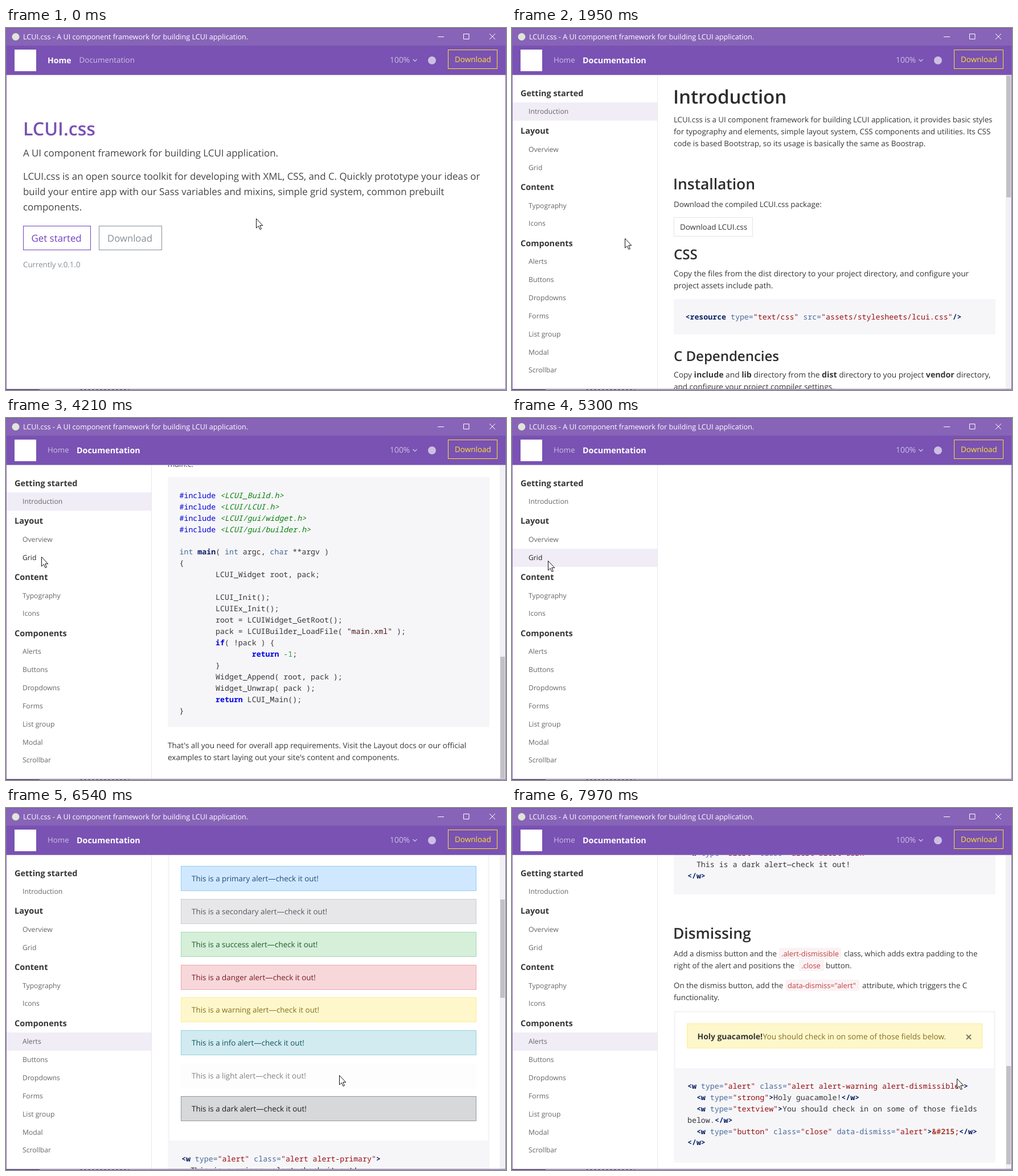
An HTML page that plays this animation: 878x637 px, repeating every 8000 ms.

```html
<!DOCTYPE html>
<html lang="en">
<head>
<meta charset="utf-8">
<title>LCUI.css</title>
<style>
html, body { margin: 0; width: 100%; height: 100%; overflow: hidden; background: #fff; }
#stage { display: block; width: 878px; height: 637px; }
text {
  font-family: "Open Sans", "Noto Sans", sans-serif; fill: #363636;
  white-space: pre; text-rendering: geometricPrecision;
}
rect { shape-rendering: crispEdges; }
.b { font-weight: 700; }
.h { font-weight: 600; fill: #2d2d2f; }
.w { fill: #fff; }
.dim { fill: #cdbfe3; }
.lead { fill: #444; }
.mono { font-family: "Noto Sans Mono", "DejaVu Sans Mono", monospace; }
.tag { fill: #0a2463; font-weight: 700; }
.attr { fill: #4a6a96; }
.str { fill: #990f0f; }
.ent { fill: #a8402f; font-weight: 700; }
.pre { fill: #0000d8; }
.inc { fill: #0a800a; font-style: italic; }
.type { fill: #456a96; }
.fn { fill: #101c6a; font-weight: 600; }
.key { fill: #0000e0; font-weight: 700; }
.cstr { fill: #4d1512; }
.num { fill: #249a3a; }
</style>
</head>
<body>
<svg id="stage" viewBox="0 0 878 637"></svg>
<script>
const BODY = 13.35, WIDE = 13.72, CODE = 13.25, LEADING = 19.95;
const PURPLE = '#7952b3', BORDER = '#8864b8', YELLOW = '#ffe12b';

// Text is placed by its left edge and the middle of its capitals.
const text = (x, mid, size, str, cls = '', extra = '') =>
  `<text x="${x}" y="${(mid + size * .357).toFixed(2)}" font-size="${size}" class="${cls}" ${extra}>${str}</text>`;
const rect = (x, y, w, h, fill, extra = '') =>
  `<rect x="${x}" y="${y}" width="${w}" height="${h}" fill="${fill}" ${extra}/>`;
const frame = (x, y, w, h, stroke, fill = 'none') =>
  rect(x + .5, y + .5, w - 1, h - 1, fill, `stroke="${stroke}"`);
const group = (id, ...parts) => `<g id="${id}">${parts.join('')}</g>`;
const span = (cls, s) => `<tspan class="${cls}">${s}</tspan>`;
const esc = s => s.replace(/&/g, '&amp;').replace(/</g, '&lt;');

// Wraps each match in the class named by its capture group.
function paint(line, rules) {
  let out = '', last = 0;
  for (const m of line.matchAll(rules)) {
    const cls = Object.keys(m.groups).find(k => m.groups[k] !== undefined);
    out += esc(line.slice(last, m.index)) + span(cls, esc(m[0]));
    last = m.index + m[0].length;
  }
  return out + esc(line.slice(last));
}
const XML = /(?<pre><\?.*\?>)|(?<tag><\/?[\w-]+|\/?>)|(?<str>"[^"]*")|(?<attr>[\w-]+=(?="))|(?<ent>&#\d+;)/g;
const C = /(?<pre>#include)|(?<inc><.*>)|(?<type>\b(?:int|char)\b)|(?<fn>\bmain(?=\())|(?<key>\b(?:if|return)\b)|(?<cstr>"[^"]*")|(?<num>-1)/g;
const code = (x, mid, src, rules = XML) => src.split('\n').map((line, i) =>
  line && text(x, mid + i * LEADING, CODE, paint(line, rules), 'mono')).join('');
const block = (y, bottom) => rect(284, y, 565, bottom - y, '#f6f6f9');
const card = (y, bottom) => rect(285.5, y + 1.5, 562, bottom - y, '#fff', 'stroke="#f6f6f9" stroke-width="3"');

// Window and navigation bar
const chrome = [
  rect(0, 0, 878, 31, BORDER), rect(0, 0, 878, 1, '#7c59ad'),
  '<circle cx="17" cy="15.5" r="6.5" fill="#dfe6d6"/>',
  text(30, 15.5, 12.66, 'LCUI.css - A UI component framework for building LCUI application.', 'w'),
  '<path d="M758 15.5h11M803.5 10.5h9.5v9h-9.5zM849 10l10 10M859 10l-10 10" fill="none" stroke="#fff"/>',
  rect(0, 31, 878, 51, PURPLE), rect(0, 82, 878, 1, '#a78bcf'),
  rect(15, 38, 38, 38, '#fff'),
  text(674, 56, 13.9, '100%', 'dim'),
  '<path d="M714.5 55l3.5 3.5l3.5-3.5" fill="none" stroke="#cdbfe3" stroke-width="1.4"/>',
  '<circle cx="748" cy="57" r="7" fill="#cdbfe3"/>',
  frame(776, 38, 87, 34, YELLOW),
  text(788, 55.5, 13.5, 'Download', '', `style="fill:${YELLOW}"`),
  group('navHome',
    text(73, 56.5, 14.1, 'Home', 'b w'),
    text(128.5, 56.5, 13.43, 'Documentation', 'dim', 'id="link"')),
  group('navDocs',
    text(73, 56.5, 13.3, 'Home', 'dim'),
    text(124, 56.5, 14.3, 'Documentation', 'b w'))
].join('');

// Window border, with the slivers of the desktop under it
const edges = rect(0, 31, 1, 605, BORDER) + rect(877, 31, 1, 605, BORDER) +
  rect(0, 635, 878, 1, '#8d70b8') + rect(0, 636, 878, 1, '#b9b9b9') + rect(0, 636, 59, 1, '#555') +
  '<path d="M131 636.5h85" stroke="#333" stroke-dasharray="2 5"/>';

const home = group('home',
  text(30, 177.5, 32.2, 'LCUI.css', 'h', `style="fill:${PURPLE}"`),
  [[220, 'A UI component framework for building LCUI application.'],
   [261, 'LCUI.css is an open source toolkit for developing with XML, CSS, and C. Quickly prototype your ideas or'],
   [288, 'build your entire app with our Sass variables and mixins, simple grid system, common prebuilt'],
   [315, 'components.']].map(([y, s]) => text(30, y, 16.89, s, 'lead')).join(''),
  frame(30, 348, 119, 43, '#6f42c1'),
  text(44.5, 370, 16.9, 'Get started', '', 'style="fill:#6f42c1"'),
  frame(163, 348, 111, 43, '#868e96'),
  text(178, 370, 16.7, 'Download', '', 'style="fill:#868e96"'),
  text(30, 416.5, 13.3, 'Currently v.0.1.0', '', 'style="fill:#868e96"'));

// Sidebar
const heads = [[115, 'Getting started'], [181, 'Layout'], [280, 'Content'], [378.5, 'Components']];
const items = [[147, 'Introduction'], [214, 'Overview'], [246, 'Grid'], [313, 'Typography'], [344, 'Icons'],
  ...['Alerts', 'Buttons', 'Dropdowns', 'Forms', 'List group', 'Modal', 'Scrollbar'].map((s, i) => [411 + i * 31.85, s])];
const side = group('side',
  rect(255, 83, 1, 552, '#e9e9ec'),
  rect(1, 131, 254, 32, '#f0edf7', 'id="active"'),
  heads.map(([y, s]) => text(15, y, 14.5, s, 'b')).join(''),
  items.map(([y, s]) => text(29, y, 12.2, s, 'item')).join(''));

const intro = group('intro',
  text(283, 121.5, 33.1, 'Introduction', 'h'),
  text(284, 161.5, 13.28, 'LCUI.css is a UI component framework for building LCUI application, it provides basic styles'),
  text(284, 182.5, 13.43, 'for typography and elements, simple layout system, CSS components and utilities. Its CSS'),
  text(284, 203.5, 13.43, 'code is based Bootstrap, so its usage is basically the same as Boostrap.'),
  text(283, 274.5, 26.4, 'Installation', 'h'),
  text(284, 310, 13.3, 'Download the compiled LCUI.css package:'),
  frame(284, 333, 139, 34, '#e2e4e8'),
  text(295, 350.5, 13.4, 'Download LCUI.css'),
  text(284, 398.5, 24, 'CSS', 'h'),
  text(284, 432.5, WIDE, 'Copy the files from the dist directory to your project directory, and configure your'),
  text(284, 453.5, WIDE, 'project assets include path.'),
  block(477, 539),
  code(304.5, 508, '<resource type="text/css" src="assets/stylesheets/lcui.css"/>'),
  text(284, 577, 24, 'C Dependencies', 'h'),
  text(284, 610.5, WIDE, 'Copy *include* and *lib* directory from the *dist* directory to you project *vendor* directory,'
    .replace(/\*(\w+)\*/g, '<tspan class="b" font-size="14.2">$1</tspan>')),
  text(284, 631.5, 13.5, 'and configure your project compiler settings.'),
  text(284, 703, 26.6, 'Starter template', 'h'),
  text(284, 738, BODY, 'main.xml:'),
  block(762, 943),
  code(304.5, 793, `<?xml version="1.0" encoding="UTF-8" ?>
<lcui-app>
  <resource type="text/css" src="assets/stylesheets/lcui.css"/>
  <ui>
    <w type="h1">Hello, world!</w>
  </ui>
</lcui-app>`),
  text(284, 975, BODY, 'main.c:'),
  block(998, 1438),
  code(304.5, 1030, `#include <LCUI_Build.h>
#include <LCUI/LCUI.h>
#include <LCUI/gui/widget.h>
#include <LCUI/gui/builder.h>

int main( int argc, char **argv )
{
        LCUI_Widget root, pack;

        LCUI_Init();
        LCUIEx_Init();
        root = LCUIWidget_GetRoot();
        pack = LCUIBuilder_LoadFile( "main.xml" );
        if( !pack ) {
                return -1;
        }
        Widget_Append( root, pack );
        Widget_Unwrap( pack );
        return LCUI_Main();
}`, C),
  text(284, 1470.5, 13.5, "That's all you need for overall app requirements. Visit the Layout docs or our official"),
  text(284, 1491.5, 13.5, "examples to start laying out your site's content and components."));

// Alerts page: name, background, border, text colour
const kinds = [
  ['primary', '#d0e8ff', '#93cbf8', '#1c4c78'], ['secondary', '#e7e7e9', '#cbcccf', '#55595c'],
  ['success', '#d5efd9', '#a3dbad', '#1a5a2a'], ['danger', '#f8d7da', '#eea5ad', '#721c24'],
  ['warning', '#fef7cb', '#fdec94', '#85701f'], ['info', '#d2ebf0', '#93d0df', '#0f5360'],
  ['light', '#fdfdfe', '#fcfcfd', '#818285'], ['dark', '#d6d8d9', '#96999c', '#1b1e21']];
const says = k => `This is a ${k} alert—check it out!`;
const badge = (x, mid, w, s) =>
  rect(x, mid - 10.5, w, 20, '#fbf2f3', 'rx="3"') + text(x + 4, mid, 12.8, s, '', 'style="fill:#bd4147"');

const alerts = group('alerts',
  text(283, 121.5, 33.1, 'Alerts', 'h'),
  card(331, 836),
  kinds.map(([k, bg, line, ink], i) => {
    const y = Math.round(353.3 + i * 57.75);
    return frame(307, y, 519, 44, line, bg) + text(326, y + 22.5, 13.4, says(k), '', `style="fill:${ink}"`);
  }).join(''),
  block(836, 1360),
  code(308, 868, kinds.map(([k]) => `<w type="alert" class="alert alert-${k}">\n  ${says(k)}\n</w>`).join('\n')),
  text(283, 1429, 26.4, 'Dismissing', 'h'),
  text(284, 1464.5, 13.26, 'Add a dismiss button and the'), badge(469, 1464.5, 109, '.alert-dismissible'),
  text(583, 1464.5, 13.26, 'class, which adds extra padding to the'),
  text(284, 1485.5, BODY, 'right of the alert and positions the'), badge(504, 1485.5, 44, '.close'),
  text(551, 1485.5, BODY, 'button.'),
  text(284, 1520, BODY, 'On the dismiss button, add the'), badge(480, 1520, 130, 'data-dismiss="alert"'),
  text(615, 1520, BODY, 'attribute, which triggers the C'),
  text(284, 1541, BODY, 'functionality.'),
  card(1565, 1668),
  frame(307, 1587, 519, 44, '#fdec94', '#fef7cb'),
  text(325.5, 1610.5, 13.9, 'Holy guacamole!', 'b'),
  text(440.5, 1610.5, 13.64, 'You should check in on some of those fields below.', '', 'style="fill:#85701f"'),
  '<path d="M798 1607l8 8M806 1607l-8 8" stroke="#7c7864" stroke-width="2"/>',
  block(1666, 1829), rect(284, 1830, 565, 1, '#ececf0'),
  code(308, 1697, `<w type="alert" class="alert alert-warning alert-dismissible">
  <w type="strong">Holy guacamole!</w>
  <w type="textview">You should check in on some of those fields
below.</w>
  <w type="button" class="close" data-dismiss="alert">&#215;</w>
</w>`));

const stage = document.getElementById('stage');
stage.innerHTML = rect(0, 0, 878, 637, '#fff') + home + side +
  `<svg x="256" y="83" width="621" height="552" viewBox="256 83 621 552">${intro}${alerts}</svg>` +
  group('bar', rect(867, 83, 10, 552, '#f1f1f1'), rect(868, 84, 8, 214, '#c2c2c2', 'id="thumb"')) +
  chrome + edges +
  '<path id="cursor" d="M.5.5V17l3.8-3.5l2.7 6l2.4-1l-2.6-5.9h5z" fill="#fff" stroke="#111" stroke-linejoin="round"/>';

// Moves: first step, last step, number of steps, target
const cursorMoves = [
  [230, 774, 8, 171, 57], [852, 930, 2, 168, 190], [1310, 1310, 1, 166, 357], [1388, 1780, 6, 171, 366],
  [1950, 2187, 4, 341, 390], [2820, 2970, 3, 432, 362], [3830, 4210, 6, 62, 244],
  [5300, 5850, 8, 86, 411], [6157, 6387, 4, 585, 470], [7330, 7730, 6, 781, 476]];
const introScroll = [[2266, 2590, 5, 446], [2660, 2740, 2, 560], [2820, 2970, 3, 730], [3280, 3360, 2, 835], [3660, 3660, 1, 894]];
const alertScroll = [[6387, 6540, 3, 251], [6790, 6790, 1, 330], [7020, 7100, 2, 480], [7330, 7970, 9, 1208]];

function follow(t, start, moves, ease = k => k) {
  let at = start;
  for (const [t0, t1, n, ...to] of moves) {
    if (t < t0) break;
    const k = n === 1 ? 1 : Math.min(n, Math.floor((t - t0) / (t1 - t0) * (n - 1)) + 1) / n;
    at = at.map((v, i) => v + (to[i] - v) * ease(k));
  }
  return at;
}
const smooth = k => k * k * (3 - 2 * k);

const $ = id => document.getElementById(id);
const rows = [...document.querySelectorAll('.item')];
const show = (id, on) => { $(id).style.display = on ? '' : 'none'; };
const shift = (id, x, y) => $(id).setAttribute('transform', `translate(${x} ${y})`);

function draw(t) {
  const [x, y] = follow(t, [439, 335], cursorMoves, smooth).map(Math.round);
  const docs = t >= 852, onIntro = t >= 1310 && t < 4540, onAlerts = t >= 6157;
  show('home', !docs); show('navHome', !docs);
  show('side', docs); show('navDocs', docs);
  show('intro', onIntro); show('alerts', onAlerts); show('bar', onIntro || onAlerts);
  shift('cursor', x, y);
  $('link').style.fill = y < 76 && x > 128 && x < 227 ? '#fff' : '';

  const active = t < 4540 ? 0 : t < 6080 ? 2 : 5;
  $('active').setAttribute('y', items[active][0] - 16);
  rows.forEach((row, i) => {
    row.style.fill = x < 255 && Math.abs(y - items[i][0]) < 16 ? '#222' : '#666';
  });

  const [top] = follow(t, [0], onAlerts ? alertScroll : introScroll).map(Math.round);
  shift(onAlerts ? 'alerts' : 'intro', 0, -top);
  $('thumb').setAttribute('y', Math.round(84 + top * (onAlerts ? .3065 : .3756)));
  $('thumb').setAttribute('height', onAlerts ? 173 : 214);
}

function tick() {
  draw((performance.now() + 2) % 8000);
  requestAnimationFrame(tick);
}
tick();
</script>
</body>
</html>
```
